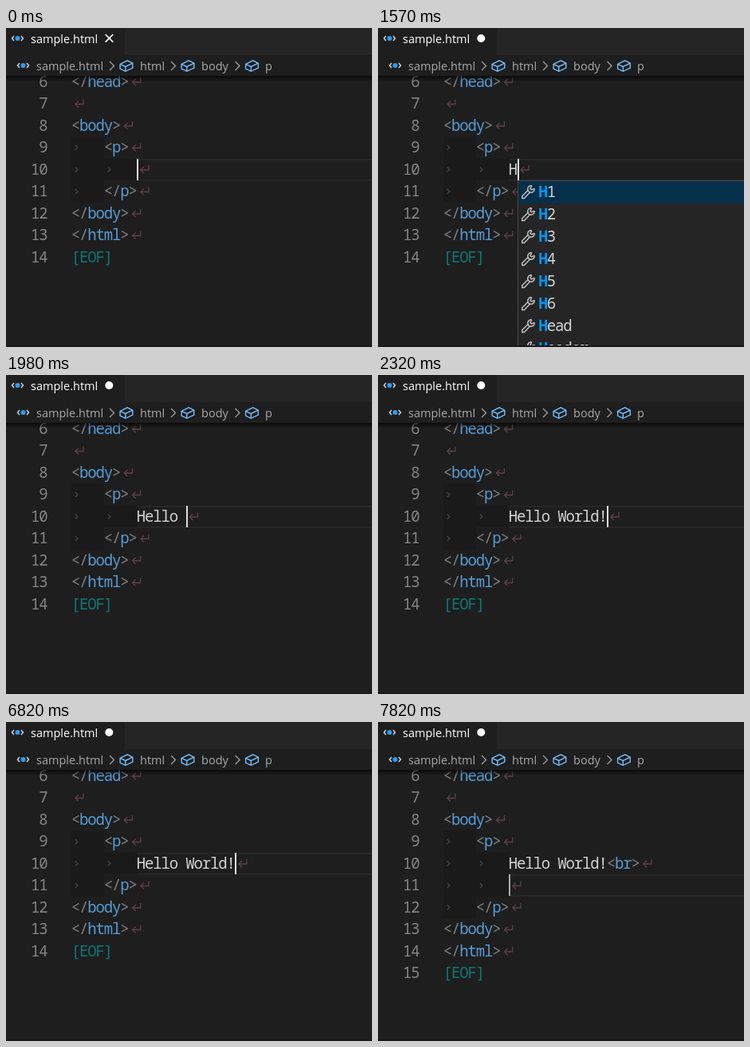
Write an HTML page with a canvas that moves like this. It is 459 px wide and 400 px high and loops after 8000 ms.

```html
<!DOCTYPE html>
<html lang="en">
<head>
<meta charset="utf-8">
<title>Editor: next line</title>
<style>
  html, body { margin: 0; width: 100%; height: 100%; overflow: hidden; background: #1e1e1e; }
  canvas { display: block; width: 459px; height: 400px; }
</style>
</head>
<body>
<canvas id="stage" width="459" height="400"></canvas>
<script>
const ctx = document.getElementById('stage').getContext('2d');
const W = 459, H = 400, LOOP = 8000;
const CELL = 10.25, LEFT = 82.4, ROW = 27.5, TOP = 53.5;
const MONO = '"Noto Sans Mono", "DejaVu Sans Mono", monospace';
const WIDE = '"Noto Sans Mono CJK JP", "Noto Sans CJK JP", "Noto Sans CJK", sans-serif';
const UI = '14.5px "Open Sans", "Noto Sans", sans-serif';
const CODE = '19px ' + MONO;
const BLUE = '#569cd6', GRAY = '#808080', TEXT = '#d4d4d4';

const MESSAGE = 'Hello World!';
// start time, typed length, suggestion list
const TYPING = [
  [1500, 1], [1570, 1, 'long'], [1630, 2], [1700, 2, 'short'], [1770, 3],
  [1840, 4], [1910, 5], [1980, 6], [2050, 7], [2120, 8], [2180, 9],
  [2250, 11], [2320, 12]
];
const LISTS = {
  long: ['H1', 'H2', 'H3', 'H4', 'H5', 'H6', 'Head', 'Header'],
  short: ['Head', 'Head', 'Header']
};

const colX = col => LEFT + col * CELL;
const rowY = row => TOP + row * ROW;

function rect(x, y, w, h, color) {
  ctx.fillStyle = color;
  ctx.fillRect(x, y, w, h);
}

function line(points, color, width = 1.3, closed = false) {
  ctx.beginPath();
  points.forEach(([x, y]) => ctx.lineTo(x, y));
  if (closed) ctx.closePath();
  ctx.strokeStyle = color;
  ctx.lineWidth = width;
  ctx.stroke();
}

function dot(x, y, r, color) {
  ctx.beginPath();
  ctx.arc(x, y, r, 0, Math.PI * 2);
  ctx.fillStyle = color;
  ctx.fill();
}

function label(text, x, y, color) {
  ctx.font = UI;
  ctx.textAlign = 'left';
  ctx.fillStyle = color;
  ctx.fillText(text, x, y);
}

// Each character sits in the middle of its grid cell.
function cells(text, x, y, color, font = CODE, cell = CELL) {
  ctx.textAlign = 'center';
  ctx.fillStyle = color;
  for (const ch of text) {
    const wide = ch > '\uff00';
    const w = wide ? cell * 2 : cell;
    ctx.font = wide ? '20px ' + WIDE : font;
    ctx.fillText(ch, x + w / 2, y);
    x += w;
  }
  return x;
}

function chevron(x, y, w, h, color, width) {
  line([[x, y - h], [x + w, y], [x, y + h]], color, width);
}

function fileIcon(x, y) {
  chevron(x - 4.5, y, -2.5, 3, '#c5d3dc', 1.5);
  chevron(x + 4.5, y, 2.5, 3, '#c5d3dc', 1.5);
  dot(x, y, 3, '#2d9cf0');
}

function cubeIcon(x, y) {
  const at = pts => pts.map(([px, py]) => [x + px * 1.2, y + py * 1.2]);
  const color = '#75beff';
  line(at([[-6.6, -1.8], [1, -5.6], [6.5, -2.8], [6.5, 2.2], [-1, 5.7], [-6.6, 3]]), color, 1.4, true);
  line(at([[-6.6, -1.8], [-1, .8], [6.5, -2.8]]), color, 1.4);
  line(at([[-1, .8], [-1, 5.7]]), color, 1.4);
}

function returnMark(x, y) {
  const color = '#5e4045';
  line([[x + 14.5, y - 5], [x + 14.5, y + 1], [x + 4.5, y + 1]], color);
  line([[x + 8.5, y - 3], [x + 4.5, y + 1], [x + 8.5, y + 5]], color);
}

function drawHeader(dirty) {
  rect(0, 0, W, 60, '#1e1e1e');
  rect(149, 0, W - 149, 34, '#252526');
  fileIcon(14.5, 13);
  label('sample.html', 31, 18.5, '#ffffff');
  if (dirty) {
    dot(129.3, 13, 5, '#ffffff');
  } else {
    line([[124.7, 8], [134.3, 17.6]], '#ffffff', 1.7);
    line([[134.3, 8], [124.7, 17.6]], '#ffffff', 1.7);
  }
  fileIcon(21.5, 47);
  label('sample.html', 38, 52.5, '#a9a9a9');
  [['html', 168, 151], ['body', 245, 228], ['p', 325, 308.5]].forEach(([name, x, icon]) => {
    chevron(icon - 21, 47.5, 5.5, 5.5, '#9a9a9a', 1.4);
    cubeIcon(icon, 47.5);
    label(name, x, 52.5, '#a9a9a9');
  });
  const shade = ctx.createLinearGradient(0, 60, 0, 67);
  shade.addColorStop(0, 'rgba(0,0,0,.65)');
  shade.addColorStop(1, 'rgba(0,0,0,0)');
  rect(0, 60, W, 7, shade);
}

function drawRow(row, number, { tabs = 0, text = '', eof = false, markCol }) {
  const y = rowY(row), mid = y + 13.5, base = mid + 6.8;
  for (let i = 0; i < tabs; i++) {
    rect(Math.round(colX(i * 4)), y, 41, ROW + .5, '#1a1a1a');
    chevron(colX(i * 4) + 4.5, mid + .5, 3, 3, '#474747', 1.2);
  }
  const num = String(number);
  cells(num, 52 - num.length * CELL, base, '#858585');
  const end = tabs * 4 + text.length;
  if (!eof) returnMark(colX(markCol ?? end), mid);
  let x = colX(tabs * 4);
  for (const part of text.match(/<\/?\w+>|[^<]+/g) || []) {
    const tag = part.match(/^(<\/?)(\w+)(>)$/);
    if (tag) {
      x = cells(tag[1], x, base, GRAY);
      x = cells(tag[2], x, base, BLUE);
      x = cells(tag[3], x, base, GRAY);
    } else {
      x = cells(part, x, base, eof ? '#0d7776' : TEXT);
    }
  }
}

function wrench(x, y) {
  const color = '#c5c5c5';
  ctx.beginPath();
  ctx.arc(x + 4, y - 4, 4.2, -.15, -1.4, false);
  ctx.strokeStyle = color;
  ctx.lineWidth = 1.5;
  ctx.stroke();
  line([[x + 8.1, y - 4.6], [x + 4.4, y - 3], [x + 3, y - 4.4], [x + 4.7, y - 8.1]], color, 1.4);
  line([[x + .1, y - 2.5], [x - 7.4, y + 5], [x - 7.2, y + 7.5], [x - 4.6, y + 7.5], [x + 2.6, y + .1]], color, 1.4);
}

function drawPopup(items, typed, x) {
  const top = 191, step = 28;
  rect(x, top, W, items.length * step + 4, '#454545');
  rect(x + 1, top + 1, W, items.length * step + 2, '#252526');
  rect(x + 1, top + 1, W, step, '#062f4a');
  items.forEach((item, i) => {
    const mid = top + 14.5 + i * step, base = mid + 6.8;
    wrench(x + 13, mid + .5);
    const next = cells(item.slice(0, typed), x + 27, base, '#0097fb', 'bold ' + CODE);
    cells(item.slice(typed), next, base, TEXT);
  });
}

function draw(t) {
  const step = TYPING.filter(s => s[0] <= t).pop();
  const typed = step ? step[1] : 0;
  const broken = t >= 7120;
  const current = broken ? 5 : 4;
  const rows = [
    { text: '</head>' },
    {},
    { text: '<body>' },
    { tabs: 1, text: '<p>' },
    { tabs: 2, text: MESSAGE.slice(0, typed) + (broken ? '<br>' : '') },
    ...(broken ? [{ tabs: 2 }] : []),
    { tabs: 1, text: '</p>' },
    { text: '</body>' },
    { text: '</html>' },
    { text: '[EOF]', eof: true }
  ];
  // The line mark trails the first keystroke.
  if (step === TYPING[0]) rows[4].markCol = 8;

  rect(0, 0, W, H, '#1e1e1e');
  const lineY = Math.round(rowY(current));
  rect(83, lineY, W, 1.6, '#282828');
  rect(83, lineY + 26, W, 1.6, '#282828');
  rows.forEach((row, i) => drawRow(i, i + 6, row));

  if (t < 500 || t >= 1000) {
    const dim = Math.min(1, Math.max(0, (t - 7720) / 100));
    const level = Math.round(222 - 50 * dim);
    const col = broken ? 8 : 8 + typed;
    rect(Math.round(colX(col)), lineY, 2, 27, `rgb(${level},${level},${level})`);
  }
  if (step && step[2]) drawPopup(LISTS[step[2]], typed, Math.round(colX(8 + typed)));
  if (t >= 3820 && t < 6820) {
    cells('[Shift]＋[Enter]：Next Line', 14, 380.5, '#ffffa6', '17px ' + MONO, 10);
  }
  rect(0, 398, W, 2, '#1a171b');
  drawHeader(typed > 0);
}

function tick() {
  draw(performance.now() % LOOP);
  requestAnimationFrame(tick);
}
tick();
</script>
</body>
</html>
```
